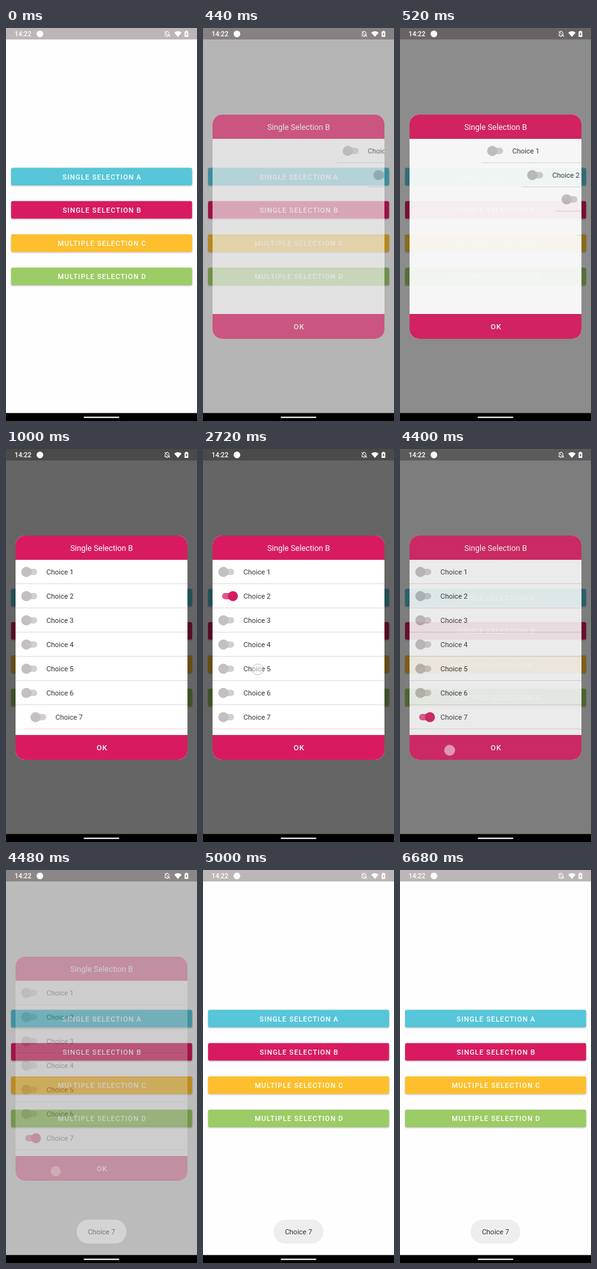
Write an HTML page that moves like this. It is 300 by 617 pixels and loops after 6840 ms.

```html
<!DOCTYPE html>
<html lang="en">
<head>
<meta charset="utf-8">
<title>Selection dialog</title>
<style>
  html, body { margin: 0; width: 100%; height: 100%; overflow: hidden; background: #fefefe; }
  svg { display: block; width: 100%; height: 100%; font-family: Roboto, sans-serif; }
  .mid { text-anchor: middle; }
  .caps { font-weight: 500; font-size: 10.95px; letter-spacing: .0893em; fill: #fff; text-anchor: middle; }
  .choice { font-size: 11px; fill: #333; }
  .button { filter: drop-shadow(0 1px 1px rgba(0, 0, 0, .28)); }

  .anim, .row, .switch, .tap {
    animation: 6840ms linear infinite backwards;
  }
  .dim { animation-name: dim; }
  .dialog { animation-name: dialog; }
  .toast { animation-name: toast; }
  .row { animation-name: slide; animation-delay: calc(var(--i) * 60ms); }

  .switch { color: #c4bfc0; fill: currentColor; }
  circle.switch { cx: 32px; filter: drop-shadow(0 .4px .5px rgba(0, 0, 0, .2)); }
  rect.switch { fill-opacity: .75; }
  .pick { animation-name: pick; }
  .keep { animation-name: keep; }

  .tap {
    opacity: 0; fill: rgba(255, 255, 255, .5); stroke: rgba(140, 135, 138, .55);
    animation-name: tap; animation-fill-mode: none;
  }

  @keyframes dim {
    0%, 4.386% { opacity: 0; }
    8.67%, 63.89% { opacity: .6; }
    66.81%, 100% { opacity: 0; }
  }
  @keyframes dialog {
    0%, 4.094% { opacity: 0; }
    7.895%, 64.035% { opacity: 1; }
    66.08%, 100% { opacity: 0; }
  }
  @keyframes toast {
    0%, 64.327% { opacity: 0; }
    66.667%, 100% { opacity: 1; }
  }
  @keyframes slide {
    0% { transform: translateX(270px); }
    4.386% { transform: translateX(270px); animation-timing-function: cubic-bezier(.364, 0, .636, 1); }
    10.234%, 80% { transform: none; }
    80.01%, 100% { transform: translateX(270px); }
  }
  /* on at 2000 ms, off 800 ms later */
  @keyframes pick {
    0%, 29.24% { color: #c4bfc0; cx: 32px; animation-timing-function: ease-in-out; }
    32.16%, 40.94% { color: #d81b60; cx: 47px; animation-timing-function: ease-in-out; }
    43.86%, 100% { color: #c4bfc0; cx: 32px; }
  }
  /* on at 3600 ms, stays until the dialog has gone */
  @keyframes keep {
    0%, 52.63% { color: #c4bfc0; cx: 32px; animation-timing-function: ease-in-out; }
    55.4%, 80% { color: #d81b60; cx: 47px; }
    80.01%, 100% { color: #c4bfc0; cx: 32px; }
  }
  @keyframes tap {
    0%, 2.34% { opacity: 1; }
    3.51%, 100% { opacity: 0; }
  }
</style>
</head>
<body>
<svg viewBox="0 0 300 617" preserveAspectRatio="none">
  <defs>
    <clipPath id="card"><rect x="15" y="136" width="270" height="352" rx="15"/></clipPath>
    <clipPath id="list"><rect x="15" y="174" width="270" height="275"/></clipPath>
  </defs>

  <rect width="300" height="617" fill="#fefefe"/>
  <rect width="300" height="18" fill="#bdb6b8"/>
  <g id="buttons"></g>
  <rect class="anim dim" width="300" height="605"/>

  <g class="anim dialog">
    <g clip-path="url(#card)">
      <rect x="15" y="136" width="270" height="352" fill="#fff"/>
      <g id="rows" clip-path="url(#list)"></g>
      <path d="M15 136h270v38h-270zM15 449h270v39h-270z" fill="#d81b60"/>
      <text class="mid" x="150.2" y="159.6" font-size="12.4" fill="#fff">Single Selection B</text>
      <text class="caps" x="151" y="472.7" style="font-size:11.8px">OK</text>
    </g>
  </g>

  <g class="anim toast">
    <rect x="111" y="549" width="78" height="37.5" rx="18" fill="#efeeef"/>
    <text class="choice mid" x="150" y="571.8">Choice 7</text>
  </g>

  <g id="taps"></g>

  <g fill="#fff">
    <text x="13.5" y="13" font-size="10.4" font-weight="500">14:22</text>
    <circle cx="53.3" cy="9.3" r="5.2"/>
    <path d="M264.2 7.2Q270 2.6 275.8 7.2L270 14z"/>
    <path d="M282 4.4h3v1h1.3v8.6h-5.8V5.4H282zM283.9 6.6l-2 3.4h1.2v2.6l2-3.5h-1.2z" fill-rule="evenodd"/>
    <path d="M250 12V8.4a3 3 0 0 1 6 0V12M249 12.2h8.2M253 4.4v1M249 5l8.6 8.8" fill="none" stroke="#fff"/>
    <path d="M252 13.2h2a1 1 0 0 1-2 0z"/>
  </g>

  <rect y="604.5" width="300" height="12.5" fill="#000"/>
  <rect x="122" y="610.2" width="56" height="2" rx="1" fill="#fff"/>
</svg>
<script>
  const fill = (id, items, draw) => {
    document.getElementById(id).innerHTML = items.map(draw).join('');
  };

  const buttons = [
    ['SINGLE SELECTION A', '#56c6d8'],
    ['SINGLE SELECTION B', '#d81b60'],
    ['MULTIPLE SELECTION C', '#fdbf2d'],
    ['MULTIPLE SELECTION D', '#9ccc65']
  ];
  fill('buttons', buttons, ([label, color], i) => {
    const y = 219.5 + i * 52.25;
    return `<rect class="button" x="8" y="${y}" width="284.3" height="27.5" rx="2.5" fill="${color}"/>
      <text class="caps" x="151" y="${y + 18}">${label}</text>`;
  });

  // Each row: animation of its switch and that animation's delay
  const rows = [[], ['pick', 0], [], [], ['pick', 800], [], ['keep', 0]];
  fill('rows', rows, ([name = '', delay = 0], i) => {
    const y = 193 + i * 38;
    const attrs = `class="switch ${name}" style="animation-delay:${delay}ms"`;
    return `<g class="row" style="--i:${i}">
      <rect ${attrs} x="30" y="${y - 5}" width="19" height="10" rx="5"/>
      <circle ${attrs} cy="${y}" r="7.8"/>
      <text class="choice" x="63.5" y="${y + 4.3}">Choice ${i + 1}</text>
      <rect x="15" y="${y + 18}" width="270" height="1" fill="#dedbdd"/>
    </g>`;
  });

  // x, y, time in ms
  const taps = [[86, 287, 40], [86, 232, 1800], [86, 346, 2600], [86, 422, 3400], [78, 473, 4280]];
  fill('taps', taps, ([x, y, t]) =>
    `<circle class="tap" cx="${x}" cy="${y}" r="8.5" style="animation-delay:${t}ms"/>`);
</script>
</body>
</html>
```
